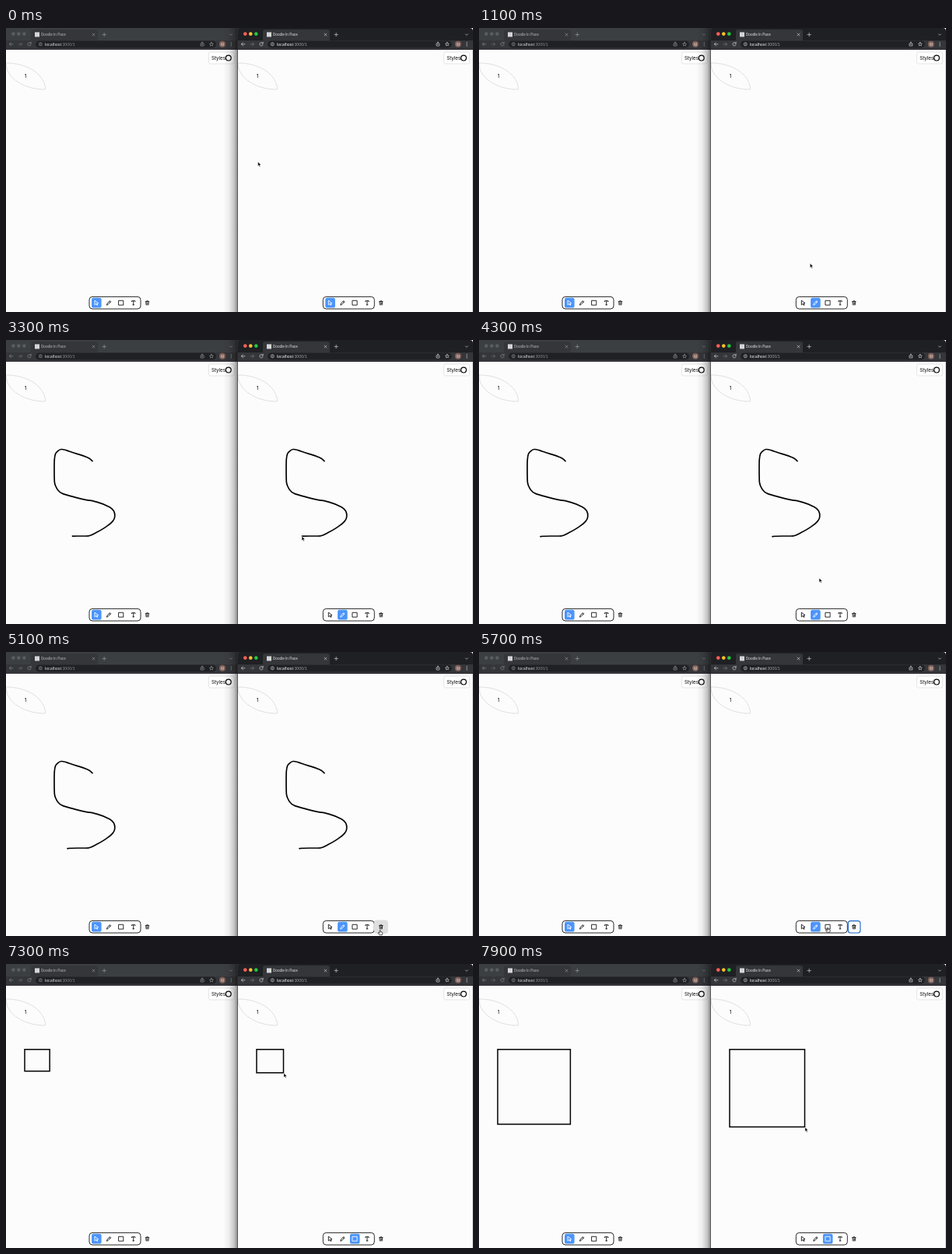
An HTML page that plays this animation: 600x365 px, repeating every 8000 ms.

```html
<!DOCTYPE html>
<html lang="en">
<head>
<meta charset="utf-8">
<title>Shared drawing board</title>
<style>
html, body { margin: 0; width: 100%; height: 100%; overflow: hidden; background: #fcfcfc; }
svg { display: block; width: 600px; height: 365px; }
text { font-family: "Liberation Sans", Arial, sans-serif; }
.page { font-family: Inter, sans-serif; }
.line { fill: none; stroke-linecap: round; stroke-linejoin: round; }
</style>
</head>
<body>
<svg id="stage" viewBox="0 0 600 365" width="600" height="365">
  <defs>
    <linearGradient id="shade">
      <stop offset="0" stop-color="#000" stop-opacity="0"/>
      <stop offset=".4" stop-color="#000" stop-opacity=".06"/>
      <stop offset=".75" stop-color="#000" stop-opacity=".22"/>
      <stop offset="1" stop-color="#000" stop-opacity=".48"/>
    </linearGradient>
    <clipPath id="leftClip"><path d="M0 0H298V365H0Z"/></clipPath>
    <clipPath id="rightClip"><path d="M298 365V4Q298 0 302 0H596Q600 0 600 4V365Z"/></clipPath>
  </defs>
  <g clip-path="url(#leftClip)">
    <g id="left"></g>
    <rect x="279" y="0" width="19" height="365" fill="url(#shade)"/>
  </g>
  <rect x="297" y="0" width="8" height="8" fill="#2b2c2e"/>
  <g clip-path="url(#rightClip)"><g id="right"></g></g>
  <path d="M297.5 4V365" stroke="#333" stroke-opacity=".7" stroke-width=".8"/>
  <path d="M599.7 28V365" stroke="#999" stroke-width=".6"/>
  <g id="cursor">
    <path id="arrow" d="M0 0V5.6L1.3 4.4L2.2 6.4L3.2 6L2.3 4H4.1Z" fill="#000" stroke="#fff" stroke-width=".5"/>
    <path id="hand" d="M-.6 .5Q0 -.3 .6 .5V2.3L2.6 2.8Q3.4 3 3.2 4L2.7 6.2H-1L-2.6 3.7Q-2.4 2.9-1.6 3.3L-.6 4Z" fill="#fff" stroke="#000" stroke-width=".65" stroke-linejoin="round"/>
  </g>
</svg>
<script>
const LOOP = 8000, STEP = 100;
const $ = id => document.getElementById(id);

const line = (d, color, width = .7) =>
  `<path class="line" d="${d}" stroke="${color}" stroke-width="${width}"/>`;
const label = (x, y, size, color, text, extra = '') =>
  `<text x="${x}" y="${y}" font-size="${size}" fill="${color}" ${extra}>${text}</text>`;

const toolIcons = [
  'M-2-2.9L2.4 .6L.4 .8L1.5 2.8L.7 3.2L-.4 1.2L-2 2.4Z',
  'M-2.5 2.6L-2 .8L1.4-2.6L2.6-1.4L-.8 2ZM.6-1.8L1.8-.6',
  'M-2.9-2.9H2.9V2.9H-2.9Z',
  'M-2.2-1.5V-2.5H2.2V-1.5M0-2.5V2.6M-.9 2.6H.9'
];

// Window chrome, with the whole header drawn at offset x
function header(x, width, active, shift) {
  const ink = active ? '#e4e5e7' : '#a5a7aa', dim = active ? '#9aa0a6' : '#85888c';
  const nav = active ? '#d5d7da' : '#85888c';
  const lights = active ? ['#ff5f57', '#febc2e', '#28c840'] : Array(3).fill('#595c60');
  const e = x + shift;
  let s = `<rect x="${x}" width="${width}" height="28" fill="${active ? '#1f2023' : '#3c3f42'}"/>`;
  s += `<path d="M${x + 30} 17Q${x + 32} 17 ${x + 32} 15V5Q${x + 32} 2 ${x + 35} 2H${x + 115}Q${x + 118} 2 ${x + 118} 5V15Q${x + 118} 17 ${x + 120} 17Z" fill="#35363a"/>`;
  s += `<rect x="${x}" y="16" width="${width}" height="11.5" fill="#35363a"/>`;
  s += `<rect x="${x + 38}" y="16.4" width="${e - x + 232}" height="9" rx="4.5" fill="#202124"/>`;
  lights.forEach((c, i) => s += `<circle cx="${x + 9.3 + i * 7}" cy="7.6" r="2.3" fill="${c}"/>`);
  s += `<rect x="${x + 37}" y="5.4" width="6" height="6" fill="#d4d5d6"/>`;
  s += label(x + 45, 10.2, 4.65, active ? '#dfe1e4' : '#b8babd', 'Doodle In Pace');
  s += line(`M${x + 111} 7l3 3m0-3l-3 3`, ink, .6);
  s += line(`M${x + 124} 8.5h4.4m-2.2-2.2v4.4`, ink, .6);
  s += line(`M${e + 287.6} 7.8l1.5 1.5l1.5-1.5`, ink, .6);
  s += line(`M${x + 9} 20.8h-4.6m2-2l-2 2l2 2`, nav, .7);
  s += line(`M${x + 16} 20.8h4.6m-2-2l2 2l-2 2`, active ? '#77797d' : '#696c70', .7);
  s += line(`M${x + 32} 19.6a2.2 2.2 0 1 0 .2 1.7M${x + 32.2} 18.2v1.6h-1.6`, nav, .7);
  s += `<circle cx="${x + 44.3}" cy="20.8" r="2" fill="none" stroke="${ink}" stroke-width=".6"/>`;
  s += line(`M${x + 44.3} 20.7v1m0-2v.1`, ink, .5);
  s += label(x + 50, 22.7, 5.3, active ? '#f0f1f2' : '#d8dadc', `localhost<tspan fill="${dim}">:3000/1</tspan>`);
  s += line(`M${e + 250.9} 20h-.8v3h4v-3h-.8M${e + 252.1} 21.6v-3.6m-1.1 1.1l1.1-1.1l1.1 1.1`, ink, .6);
  let star = '';
  for (let i = 0; i < 10; i++) {
    const r = i % 2 ? 1.15 : 2.6, a = i * Math.PI / 5;
    star += (i ? 'L' : 'M') + (e + 264 + r * Math.sin(a)) + ' ' + (20.9 - r * Math.cos(a));
  }
  s += line(star + 'Z', ink, .55);
  s += `<circle cx="${e + 278}" cy="20.8" r="4" fill="#84625a"/>`;
  s += label(e + 278, 22.5, 4.5, '#f0e8e5', 'M', 'text-anchor="middle"');
  [-2, 0, 2].forEach(d => s += `<circle cx="${e + 289.3}" cy="${20.8 + d}" r=".6" fill="${ink}"/>`);
  return s;
}

function board(name, x, width, barX, styleX, active, shift) {
  let s = `<rect x="${x}" y="27" width="${width}" height="338" fill="#fcfcfc"/>`;
  s += header(x, width, active, shift);
  s += `<path d="M${x} 45A50.3 34 0 0 1 ${x + 50.5} 79A50.3 34 0 0 1 ${x} 45Z" fill="none" stroke="#b5b5b5" stroke-width=".6" stroke-dasharray="1.2 .5"/>`;
  s += label(x + 25, 64, 6.2, '#000', '1', 'class="page" text-anchor="middle"');
  s += `<rect x="${styleX}" y="31" width="33" height="15" rx="2.2" fill="#fff" stroke="#dedede" stroke-width=".8"/>`;
  s += label(styleX + 3.6, 40.9, 6.2, '#000', 'Styles', 'class="page"');
  s += `<circle cx="${styleX + 25.4}" cy="38.6" r="3.4" fill="none" stroke="#000" stroke-width="1.2"/>`;
  s += `<path id="${name}Ink" class="line" stroke="#000" stroke-width="1.7"/>`;
  s += `<rect id="${name}Box" fill="none" stroke="#000" stroke-width="1.5"/>`;
  s += `<rect x="${barX}" y="345.4" width="66" height="15.6" rx="4" fill="#fff" stroke="#111" stroke-width=".9"/>`;
  s += `<rect id="${name}Mark" y="346.8" width="12.6" height="12.8" rx="2.2" fill="#4b94fb"/>`;
  toolIcons.forEach((d, i) => {
    s += `<path id="${name}Tool${i}" class="line" d="${d}" transform="translate(${barX + 9.3 + i * 15.8} 353.2)" stroke-width=".9"/>`;
  });
  s += `<rect id="${name}Hover" x="${barX + 65.6}" y="344.6" width="18" height="17.4" rx="4" fill="#dedede"/>`;
  s += `<rect id="${name}Ring" x="${barX + 67}" y="345.6" width="15.6" height="15.4" rx="3" fill="none" stroke="#1f66c9" stroke-width="1.1"/>`;
  s += `<g transform="translate(${barX + 74.5} 353.2)">` +
    line('M-2.4-1.6H2.4M-.9-1.6V-2.5H.9V-1.6M-1.8-1.6L-1.6 2.6H1.6L1.8-1.6M-.6-.4V1.5M.6-.4V1.5', '#111', .75) + '</g>';
  $(name).innerHTML = s;
}

board('left', 0, 298, 107, 260.4, false, 0);
board('right', 298, 302, 407.3, 562.6, true, 303);
// the right header's far icons sit 5 px further out than its near ones
$('right').innerHTML = '';
board('right', 298, 302, 407.3, 562.6, true, 4.8);

const strokePoints = [
  [111, 155.6], [107, 152], [100, 149], [87, 145], [74, 140.6], [69, 140.4], [62, 147], [62, 180],
  [63, 187], [68.5, 196], [80, 200], [104, 206], [110, 206.3], [126, 211], [137, 217], [140, 223],
  [139.5, 230], [134, 236.5], [121, 245], [108, 251.5], [104, 252], [84, 252], [79, 252.6]
];
// Polyline with slightly rounded corners
function smooth(points, dx) {
  const p = points.map(([x, y]) => [x + dx, y]);
  const mix = (a, b, k) => [a[0] + (b[0] - a[0]) * k, a[1] + (b[1] - a[1]) * k];
  let d = 'M' + p[0];
  for (let i = 1; i < p.length - 1; i++)
    d += 'L' + mix(p[i], p[i - 1], .4) + 'Q' + p[i] + ' ' + mix(p[i], p[i + 1], .4);
  return d + 'L' + p[p.length - 1];
}
$('leftInk').setAttribute('d', smooth(strokePoints, 0));
$('rightInk').setAttribute('d', smooth(strokePoints, 298));
const inkLength = $('rightInk').getTotalLength();

// Interpolates rows of [time, ...values]
function track(rows, t, ease = k => k) {
  let i = 0;
  while (i < rows.length - 2 && t >= rows[i + 1][0]) i++;
  const a = rows[i], b = rows[i + 1];
  const k = ease(Math.min(1, Math.max(0, (t - a[0]) / (b[0] - a[0]))));
  return a.slice(1).map((v, j) => v + (b[j + 1] - v) * k);
}
const easeInOut = k => k * k * (3 - 2 * k);

const inkRows = [[1300, 0], [1800, .3], [2200, .513], [2700, .77], [3300, .984], [3500, 1]];
const boxRows = [[6800, 0, 0], [6900, 3, 2], [7300, 34.5, 30], [7900, 96.5, 99.6], [8000, 104, 106]];
const moveRows = [
  [0, 323.6, 172], [100, 325, 178], [600, 431, 354], [1000, 431, 354], [1300, 409, 155.6]
];
const leaveRows = [
  [3600, 377, 252.6], [3800, 381, 256], [4600, 463, 329], [4800, 480.6, 357.4], [5400, 480.6, 357.4],
  [5700, 448, 354], [6100, 448, 354], [6400, 368.6, 116], [6700, 321.8, 109.8], [6800, 321.8, 109.8]
];

function pointer(t) {
  if (t < 1300) return track(moveRows, t, easeInOut);
  if (t < 3600) {
    const p = $('rightInk').getPointAtLength(inkLength * track(inkRows, t + 50)[0]);
    return [p.x, p.y];
  }
  if (t < 6800) return track(leaveRows, t, easeInOut);
  const [w, h] = track(boxRows, t);
  return [322.4 + w, 110.2 + h];
}

const show = (id, on) => $(id).setAttribute('visibility', on ? 'visible' : 'hidden');

function drawShapes(name, x, t) {
  const ink = $(name + 'Ink'), box = $(name + 'Box');
  const shown = track(inkRows, t)[0] * inkLength;
  show(name + 'Ink', t > 1300 && t < 5300);
  ink.setAttribute('stroke-dasharray', shown + ' ' + inkLength * 2);
  const [w, h] = track(boxRows, t);
  show(name + 'Box', t > 6800);
  box.setAttribute('x', x + 24);
  box.setAttribute('y', 109.8);
  box.setAttribute('width', w);
  box.setAttribute('height', h);
}

function selectTool(name, barX, tool) {
  $(name + 'Mark').setAttribute('x', barX + 3 + tool * 15.8);
  toolIcons.forEach((d, i) => $(name + 'Tool' + i).setAttribute('stroke', i === tool ? '#fff' : '#111'));
}

function draw(time) {
  const t = Math.floor((time % LOOP) / STEP) * STEP;
  drawShapes('right', 298, t);
  drawShapes('left', 0, t - 30);
  selectTool('left', 107, 0);
  selectTool('right', 407.3, t < 800 ? 0 : t < 5900 ? 1 : 2);

  const [x, y] = pointer(t);
  const inBar = y > 345 && y < 362;
  const onTrash = inBar && x > 473 && x < 491;
  const onTool = inBar && x > 409 && x < 472;
  show('leftHover', false);
  show('leftRing', false);
  show('rightHover', onTrash);
  show('rightRing', t >= 5300 && t < 6800);
  show('hand', onTrash || onTool);
  show('arrow', !onTrash && !onTool);
  $('cursor').setAttribute('transform', `translate(${x.toFixed(2)} ${y.toFixed(2)})`);
}

const start = performance.now();
function tick() {
  draw(performance.now() - start);
  requestAnimationFrame(tick);
}
tick();
</script>
</body>
</html>
```
